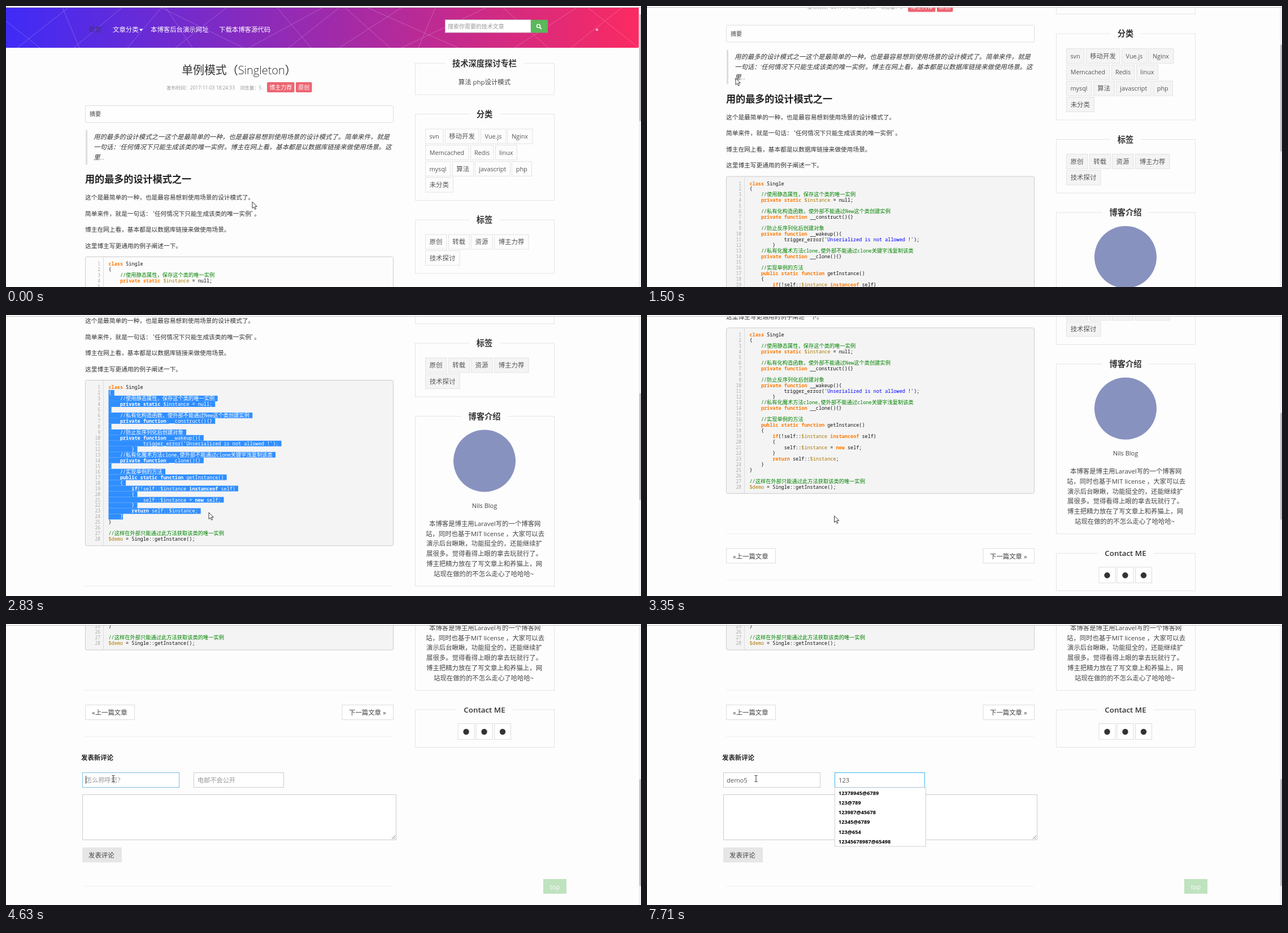
Recreate the animation shown at these times as an HTML page. Size 1124 px wide and 498 px high, loop 8 s.

```html
<!DOCTYPE html>
<html lang="zh-CN">
<head>
<meta charset="utf-8">
<style>
html, body { margin: 0; width: 100%; height: 100%; overflow: hidden; background: #fdfdfd; }
svg { display: block; width: 100vw; height: 100vh; font-family: "Open Sans", "Noto Sans CJK SC", sans-serif; }
text { white-space: pre; }
.cjk { font-family: "Noto Sans CJK SC", sans-serif; }
.code { font-family: "Noto Sans Mono", "Noto Sans CJK SC", monospace; font-size: 8.5px; fill: #111; }
.code .han { font-size: 9.26px; }
.key { fill: #ff7800; font-weight: bold; }
.var { fill: #a70; }
.note { fill: #008200; }
.str { fill: #00f; }
.sel, .sel tspan { fill: #fff; }
.panel { fill: #f4f4f4; }
.pale .panel { fill: #fcfcfc; }
</style>
</head>
<body>
<svg id="stage" viewBox="0 0 1124 498" preserveAspectRatio="none"></svg>
<script>
const LOOP = 8000, ROW = 9.975, CODE_TOP = 452, CODE_X = 181.5, CH = 5.1;
const svg = document.getElementById('stage');

const esc = s => s.replace(/&/g, '&amp;').replace(/</g, '&lt;');
// cy is the middle of the line of text
const text = (x, cy, s, size = 11.4, fill = '#444', extra = '') =>
  `<text x="${x}" y="${(cy + size * 0.37).toFixed(2)}" font-size="${size}" fill="${fill}" ${extra}>${esc(s)}</text>`;
const rect = (x, y, x2, y2, fill = 'none', stroke = 'none', extra = '') =>
  `<rect x="${x}" y="${y}" width="${x2 - x}" height="${y2 - y}" fill="${fill}" stroke="${stroke}" ${extra}/>`;
const rule = y => rect(140, y, 685, y + 1, '#eee');
const MID = 'text-anchor="middle"', BOLD = 'font-weight="bold"';

function header() {
  const ends = [[-30, 60], [100, 130], [110, 20], [205, 120], [275, 215], [283, 330], [275, 420],
    [390, 300], [480, 540], [560, 430], [590, 500], [600, 680], [700, 590], [640, 800], [760, 730],
    [850, 700], [880, 960], [1010, 900], [1030, 1120], [1090, 1000]];
  const lines = ends.map(([a, b]) => `M${a} 3L${b} 74`).join('');
  return `<defs><linearGradient id="sky"><stop stop-color="#3f2bf6"/><stop offset="1" stop-color="#fb2a62"/></linearGradient>
    <clipPath id="band"><rect y="3" width="1120" height="71"/></clipPath></defs>` +
    rect(0, 3, 1120, 74, 'url(#sky)') +
    `<path d="${lines}" stroke="#fff" stroke-width=".8" opacity=".28" clip-path="url(#band)"/>` +
    '<circle cx="1046" cy="42" r="2.3" fill="#fff" opacity=".6"/>' +
    text(146, 42, '首页', 11.4, '#333', 'opacity=".7"') +
    text(189, 42, '文章分类', 11.4, '#fff') +
    '<path d="M235.5 40.5h7l-3.5 4z" fill="#fff"/>' +
    text(256, 42, '本博客后台演示网址', 11.4, '#fff') +
    text(377, 42, '下载本博客源代码', 11.4, '#fff') +
    rect(777.5, 24.5, 929, 47, '#fff', '#ccc') +
    text(782, 36, '搜索你需要的技术文章', 9.98, '#999') +
    rect(929, 24.5, 959, 47.5, '#5cb85c') +
    '<circle cx="942.5" cy="35.5" r="3" fill="none" stroke="#fff" stroke-width="1.6"/><path d="M944.7 37.7l3.2 3.2" stroke="#fff" stroke-width="2"/>';
}

function article() {
  const badge = (x, x2, s) => rect(x, 135, x2, 153, '#ec6572', 'none', 'rx="2"') +
    text((x + x2) / 2, 144, s, 9.98, '#fff', MID);
  const quote = ['用的最多的设计模式之一这个是最简单的一种，也是最容易想到使用场景的设计模式了。简单来件，就是',
    '一句话：‘任何情况下只能生成该类的唯一实例’。博主在网上看，基本都是以数据库链接来做使用场景。这', '里...'];
  const paras = ['这个是最简单的一种，也是最容易想到使用场景的设计模式了。',
    '简单来件，就是一句话：‘任何情况下只能生成该类的唯一实例’。',
    '博主在网上看，基本都是以数据库链接来做使用场景。', '这里博主写更通用的例子阐述一下。'];
  return text(311, 114, '单例模式（Singleton）', 19.95, '#333', 'font-weight="300"') +
    text(284, 144.5, '发布时间：2017-11-03 18:24:33', 8.4, '#999') +
    text(414, 144.5, '浏览量：5', 8.4, '#999') +
    badge(462, 510.5, '博主力荐') + badge(513, 541.5, '原创') +
    rect(140.5, 176.5, 685.5, 206.5, '#fefefe', '#ddd', 'rx="2"') + text(148, 191.5, '摘要', 9.98) +
    rect(141, 220, 144, 281, '#ddd') +
    quote.map((s, i) => text(155, 232 + i * 18, s, 11.4, '#333', 'font-style="italic" font-weight="300"')).join('') +
    text(140, 307, '用的最多的设计模式之一', 17.1, '#222', BOLD) +
    paras.map((s, i) => text(140, 339.5 + i * 28.5, s, 10.69, '#333', 'class="cjk"')).join('');
}

const source = `class Single
{
    //使用静态属性，保存这个类的唯一实例
    private static $instance = null;

    //私有化构造函数，使外部不能通过New这个类创建实例
    private function __construct(){}

    //防止反序列化后创建对象
    private function __wakeup(){
            trigger_error('Unserialized is not allowed !');
        }
    //私有化魔术方法clone,使外部不能通过clone关键字浅复制该类
    private function __clone(){}

    //实现单例的方法
    public static function getInstance()
    {
        if(!self::$instance instanceof self)
        {
            self::$instance = new self;
        }
        return self::$instance;
    }
}

//这样在外部只能通过此方法获取该类的唯一实例
$demo = Single::getInstance();`.split('\n');

const HAN = /[\u3000-\u9fff\uff00-\uffef]+/g;
const span = (cls, s) => `<tspan class="${cls}">${s}</tspan>`;
const lineWidth = s => [...s].reduce((w, c) => w + (c > '\u2fff' ? 9.26 : CH), 0);
function paint(s) {
  if (s.startsWith('//')) return span('note', s.replace(HAN, h => span('han', h)));
  return s.replace(/('[^']*')|(\$\w+)|\b(class|private|public|static|function|if|instanceof|new|return)\b/g,
    (m, str, v) => span(str ? 'str' : v ? 'var' : 'key', m));
}

function code() {
  let out = rect(140.5, 444.5, 685.5, 738, '', '#ccc', 'rx="3" class="panel"') + rect(172, 445, 173, 737.5, '#ddd');
  source.forEach((s, i) => {
    const cy = 457 + i * ROW, body = s.trimStart();
    out += `<text class="code" x="167" y="${cy + 3}" text-anchor="end" style="fill:#aaa;font-size:8px">${i + 1}</text>` +
      `<rect class="mark" x="${CODE_X}" y="${cy - 5}" height="${ROW}" width="0" fill="#2f8eff"/>` +
      `<text class="code line" x="${CODE_X + (s.length - body.length) * CH}" y="${cy + 3}">${paint(body)}</text>`;
  });
  return out;
}

function sidebar() {
  const box = (y, y2, title, half, size = 14.25) => rect(724.5, y, 970.5, y2, 'none', '#e5e5e5') +
    rect(847 - half, y - 2, 847 + half, y + 2, '#fdfdfd') +
    text(847, y, title, size, '#333', MID + ' font-weight="600"');
  const tags = (cy, list) => list.map(([x, x2, s]) => rect(x + .5, cy - 13, x2, cy + 13, '', '#e3e3e3', 'class="panel"') +
    text((x + x2) / 2, cy, s, /^[\w.]+$/.test(s) ? 10.8 : 11.4, '#555', MID)).join('');
  const about = [[749, '本博客是博主用Laravel写的一个博客网'], [743, '站，同时也基于MIT license ，大家可以去'],
    [744, '演示后台瞅瞅，功能挺全的，还能继续扩'], [744, '展很多。觉得看得上眼的拿去玩就行了。'],
    [744, '博主把精力放在了写文章上和养猫上，网'], [757, '站现在做的的不怎么走心了哈哈哈~']];
  return box(101.5, 157, '技术深度探讨专栏', 70) + text(847, 135, '算法 php设计模式', 11.4, '#444', MID) +
    box(191.5, 344.5, '分类', 27) +
    tags(231, [[742, 774, 'svn'], [777, 837, '移动开发'], [840, 885, 'Vue.js'], [887, 932, 'Nginx']]) +
    tags(259.7, [[742, 819, 'Memcached'], [822, 863, 'Redis'], [866, 904.5, 'linux']]) +
    tags(288.5, [[742, 787, 'mysql'], [790, 827.5, '算法'], [830, 892.5, 'javascript'], [895, 930.5, 'php']]) +
    tags(317, [[742, 791.5, '未分类']]) +
    box(379, 474, '标签', 27) +
    tags(418, [[742, 780, '原创'], [783, 820.5, '转载'], [823, 861, '资源'], [864, 925, '博主力荐']]) +
    tags(446.7, [[742, 803, '技术探讨']]) +
    box(508.5, 809.5, '博客介绍', 41) +
    '<circle cx="847" cy="587.5" r="55" fill="#8892bf"/>' +
    text(847, 666.5, 'Nils Blog', 11, '#444', MID) +
    about.map(([x, s], i) => text(x, 698.5 + i * 17.8, s, 11.4)).join('') +
    box(844, 910.5, 'Contact ME', 50, 13.4) +
    [814.5, 846.5, 879].map(x => rect(x - 14.5, 868.5, x + 14.5, 896.5, '#fff', '#ddd') +
      `<circle cx="${x}" cy="883" r="5.2" fill="#333"/>`).join('');
}

function comments() {
  return rule(809) + rect(140.5, 835.5, 227.5, 861.5, '#fff', '#ddd') + text(152, 849, '«上一篇文章') +
    rect(595, 835.5, 685.5, 861.5, '#fff', '#ddd') + text(607, 849, '下一篇文章 »') +
    rule(891) + text(133, 929, '发表新评论', 11.4, '#222', BOLD) +
    rect(135.5, 955.5, 306.5, 981.5, '#fff', '#ccc', 'id="box0"') +
    rect(332.5, 955.5, 491.5, 981.5, '#fff', '#ccc', 'id="box1"') +
    text(141, 968.5, '', 11.2, '#999', 'id="val0"') + text(339, 968.5, '', 11.2, '#999', 'id="val1"') +
    '<rect id="caret" y="961" width="1" height="14" fill="#333"/>' +
    rect(135.5, 994.5, 690.5, 1074.5, '#fff', '#ccc') +
    '<path d="M683 1073l6-6M686.5 1073l2.5-2.5" stroke="#777"/>' +
    rect(135, 1088, 205, 1114.5, '#e6e6e6') + text(146, 1102, '发表评论') + rule(1156) +
    '<g id="menu"></g>';
}

svg.innerHTML = rect(0, 0, 1124, 498, '#fdfdfd') +
  `<g id="page">${header()}${article()}${code()}${sidebar()}${comments()}</g>` +
  `<g id="up">${rect(951, 452, 992, 478, '#bfe2bf')}${text(971.5, 465.5, 'top', 11, '#fff', MID)}</g>` +
  rect(1120, 3, 1124, 498, '#f1f1f1') + rect(1121, 15, 1124, 204, '#c1c1c1', 'none', 'id="thumb"') +
  rect(0, 0, 1124, 2, '#fff') + rect(0, 2, 1124, 3, '#c4c4c4') +
  '<path id="arrow" d="M0 0v11.6l2.7-2.5 1.9 4.3 1.9-.9-1.9-4.1h3.7z" fill="#fff" stroke="#222" stroke-width=".9"/>' +
  '<path id="beam" d="M-2.5 -5.5h2l.5 .5 .5-.5h2M0 -5v10M-2.5 5.5h2l.5-.5 .5 .5h2" fill="none" stroke="#333"/>';

const $ = id => document.getElementById(id);
const marks = [...svg.querySelectorAll('.mark')], lines = [...svg.querySelectorAll('.line')];

// The screen is refreshed only at these moments
const even = (a, b, n) => Array.from({ length: n }, (_, i) => a + (b - a) * i / (n - 1));
const steps = [0, ...even(150, 1180, 7), ...even(1350, 2340, 8), ...even(2480, 3480, 7), ...even(3650, 4630, 7),
  4780, 5060, ...even(5470, 5870, 4), ...even(6170, 6450, 3), 6730, 7140, 7710];

const scrolls = [[0, 0], [80, 0], [480, 285], [1180, 285], [1340, 142.5], [1900, 142.5], [2600, 329],
  [3000, 329], [3480, 471], [3640, 549.5], [3820, 549.5], [4300, 692]];
const mouse = [[0, 436, 347], [140, 436, 347], [480, 397, 303], [680, 397, 303], [1200, 210, 200], [1480, 157, 128],
  [1640, 157, 128], [1900, 182, 322], [2340, 300, 470], [2800, 359, 350], [3000, 359, 350], [3640, 303, 362],
  [3820, 303, 362], [4300, 215, 300], [4600, 190, 274], [5100, 190, 274], [5470, 193, 274]];
const fade0 = [[4550, 0], [4700, 1], [6100, 1], [6300, 0]];
const fade1 = [[6100, 0], [6400, 1]];

function at(keys, t, k = 1) {
  const i = keys.findIndex(p => p[0] > t);
  if (i < 0) return keys[keys.length - 1][k];
  if (i === 0) return keys[0][k];
  const a = keys[i - 1], b = keys[i];
  return a[k] + (b[k] - a[k]) * (t - a[0]) / (b[0] - a[0]);
}

const NAME = 'demo5';
const names = [NAME, 'demo58'];
const mails = ['12378945@6789', '123@789', '123987@45678', '12345@6789', '123@654', '12345678987@65498'];

function typedName(t) {
  if (t < 5470) return '';
  const n = Math.round((t - 5470) / 133.3);
  return n >= 3 ? NAME : NAME.slice(0, n + 1);
}
function menu(x, x2, items) {
  if (!items.length) return '';
  return rect(x + .5, 981.8, x2 - .5, 983.5 + items.length * 17.1, '#fff', '#d0d0d0') +
    items.map((s, i) => text(x + 7, 991.7 + i * 17.1, s, 9.2, '#000', BOLD)).join('');
}
function field(i, value, hint, focus) {
  const mix = [204, 204, 204].map((c, k) => Math.round(c + ([59, 180, 242][k] - c) * focus));
  $('box' + i).setAttribute('stroke', `rgb(${mix})`);
  $('val' + i).textContent = value || hint;
  $('val' + i).setAttribute('fill', value ? '#555' : '#999');
}

function select(t, y) {
  const on = t >= 1950 && t < 3100;
  const last = on ? Math.min(24, Math.floor((y + 5 - CODE_TOP) / ROW) + 1) : 0;
  source.forEach((s, i) => {
    const hit = i > 0 && i < last;
    marks[i].setAttribute('width', hit ? lineWidth(s) + (i === last - 1 ? 0 : CH) : 0);
    lines[i].classList.toggle('sel', hit);
  });
}

function draw(now) {
  const t = steps.filter(s => s <= now).pop();
  const y = at(scrolls, t), mx = at(mouse, t), my = at(mouse, t, 2);
  $('page').setAttribute('transform', `translate(0 ${-y})`);
  $('page').classList.toggle('pale', t < 150);
  $('thumb').setAttribute('y', 15 + y * .376);
  $('up').setAttribute('opacity', y > 430 ? 1 : 0);
  select(t, my + y);

  const beam = t > 4500;
  $('arrow').setAttribute('visibility', beam ? 'hidden' : 'visible');
  $('beam').setAttribute('visibility', beam ? 'visible' : 'hidden');
  $(beam ? 'beam' : 'arrow').setAttribute('transform', `translate(${mx} ${my})`);

  const name = typedName(t), mail = t >= 7140 ? '123' : '';
  field(0, name, '怎么称呼您？', at(fade0, t));
  field(1, mail, '电邮不会公开', at(fade1, t));
  const second = t >= 6170;
  const value = second ? mail : name;
  const width = value ? $(second ? 'val1' : 'val0').getComputedTextLength() : 0;
  const off = t < 4600 || (t >= 5060 && t < 5470) || (t >= 6730 && t < 7140) || t >= 7710;
  $('caret').setAttribute('x', Math.round((second ? 339 : 141) + width));
  $('caret').setAttribute('visibility', off ? 'hidden' : 'visible');
  $('menu').innerHTML = second ? menu(332, 494, mail ? mails : [])
    : menu(134.5, 309, name ? names.slice(0, name === NAME ? 1 : 2) : []);
}

const start = performance.now();
function tick() {
  draw((performance.now() - start) % LOOP);
  requestAnimationFrame(tick);
}
tick();
</script>
</body>
</html>
```
